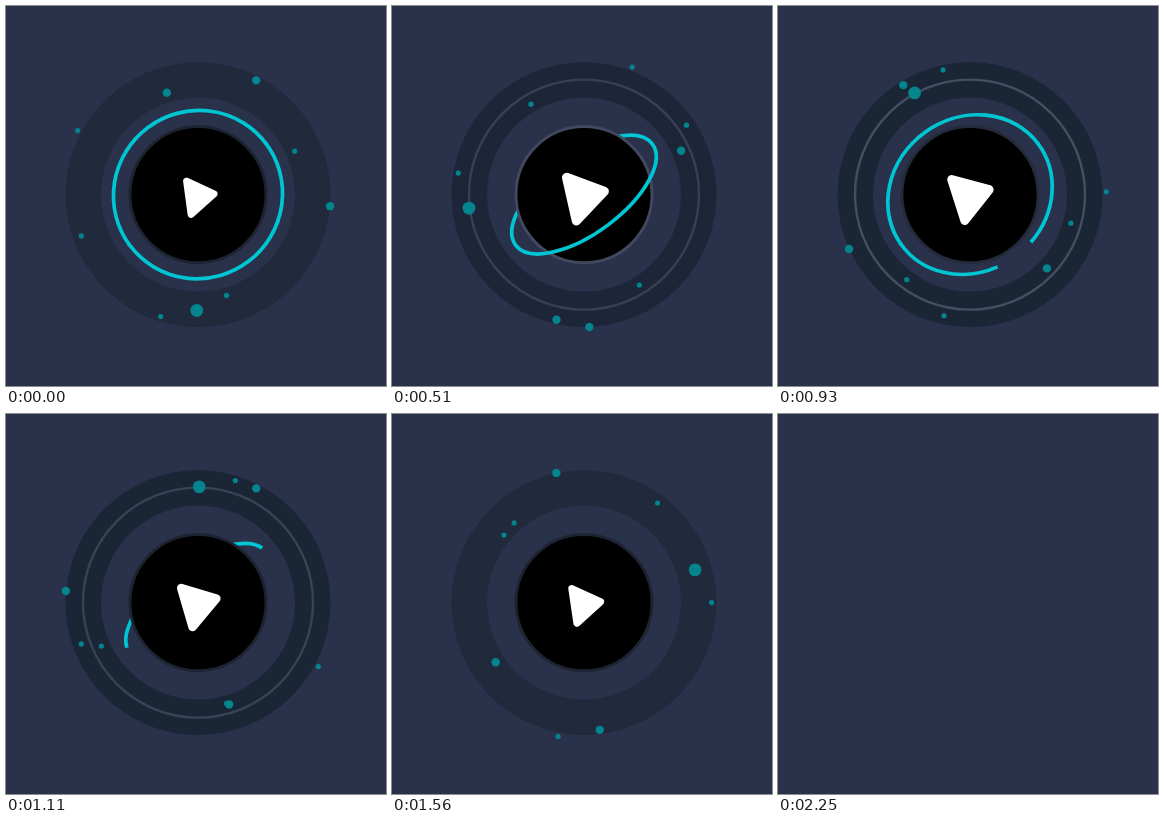
Recreate the animation shown at these times as an HTML page with a canvas. Size 380 by 380 pixels, loop 2.28 s.

```html
<!DOCTYPE html>
<html lang="en">
<head>
<meta charset="utf-8">
<title>Play button in orbit</title>
<style>
  html, body { margin: 0; width: 100%; height: 100%; overflow: hidden; background: #2a314a; }
  canvas { display: block; width: 380px; height: 380px; }
</style>
</head>
<body>
<canvas id="stage" width="380" height="380"></canvas>
<script>
const ctx = document.getElementById('stage').getContext('2d');
const LOOP = 2280, STEP = 30, LAP = 2220, END = 2250;
const CX = 192, CY = 188.6, TAU = Math.PI * 2;
const BG = '#2a314a', CYAN = '#00c5d3', TEAL = '#04848d';
const TILT = -36.4;

// orbit radius, start angle, dot radius, laps per loop
const dots = [
  [115.8, 90.6, 6.4, 1],
  [106.6, -107, 4.2, 1],
  [128.2, -63, 4.2, 2],
  [132.6, 5, 4.2, 1],
  [136.3, 208, 2.6, 1],
  [106, -24.2, 2.6, 1],
  [123.8, 160.5, 2.6, 2],
  [127.6, 107, 2.6, 1],
  [104.8, 74.2, 2.6, 2]
];

const rad = d => d * Math.PI / 180;
const mix = (a, b, k) => a + (b - a) * k;
const clamp = x => Math.min(1, Math.max(0, x));
const ramp = (t, a, b) => clamp((t - a) / (b - a));
const ease = (t, a, b) => { const p = ramp(t, a, b); return p * p * (3 - 2 * p); };
const pulse = (t, a, b, c, d) => ease(t, a, b) - ease(t, c, d);
const blend = (a, b, k) => `rgb(${a.map((v, i) => Math.round(mix(v, b[i], k)))})`;

function disc(x, y, r, fill) {
  ctx.beginPath();
  ctx.arc(x, y, r, 0, TAU);
  ctx.fillStyle = fill;
  ctx.fill();
}

function circle(r, width, color) {
  ctx.beginPath();
  ctx.arc(CX, CY, r, 0, TAU);
  ctx.lineWidth = width;
  ctx.strokeStyle = color;
  ctx.stroke();
}

function band(t) {
  const dark = pulse(t, 330, 630, 1080, 1500);
  disc(CX, CY, 132.5, blend([33, 41, 61], [26, 37, 54], dark));
  disc(CX, CY, 97, BG);
  const line = pulse(t, 330, 630, 900, 1500);
  if (line > 0) circle(115, 2.4, `rgba(76,83,102,${0.9 * line})`);
}

// The ring spins about its long axis; gap is the half angle missing at the front.
function ring(t, front) {
  const late = t > 1900;
  const spin = 10 + 0.21 * (late ? t - LAP : t);
  const gap = 180 * (late ? 1 - ease(t, 1980, LAP) : ramp(t, 900, 1283));
  if (gap >= 180) return;
  const b = 85 * Math.abs(Math.cos(rad(spin)));
  const arc = (from, to) => {
    if (to <= from) return;
    ctx.beginPath();
    ctx.ellipse(CX, CY, 85, b, rad(TILT), rad(from), rad(to));
    ctx.stroke();
  };
  ctx.lineWidth = 3.7;
  ctx.strokeStyle = CYAN;
  if (!front) {
    const cut = Math.max(0, gap - 90);
    arc(180 + cut, 360 - cut);
  } else if (gap === 0) {
    arc(-1, 181);
  } else {
    arc(-1, 90 - gap);
    arc(90 + gap, 181);
  }
}

function planet(t) {
  disc(CX, CY, 68, '#000');
  circle(68, 2.8, blend([29, 35, 48], [74, 81, 104], pulse(t, 0, 300, 300, 1140)));
}

function playIcon(t) {
  const k = 1 + 0.345 * pulse(t, 0, 600, 600, 1800);
  ctx.save();
  ctx.translate(mix(191.2, 190.3, (k - 1) / 0.345), 190.4);
  ctx.rotate(rad(-10 * pulse(t, 150, 870, 930, 1680)));
  ctx.scale(k, k);
  ctx.beginPath();
  ctx.moveTo(-10.6, -15.3);
  ctx.lineTo(16.8, -2.4);
  ctx.lineTo(-6.1, 18);
  ctx.closePath();
  ctx.lineJoin = 'round';
  ctx.lineWidth = 7;
  ctx.strokeStyle = ctx.fillStyle = '#fff';
  ctx.fill();
  ctx.stroke();
  ctx.restore();
}

function draw(t) {
  ctx.fillStyle = BG;
  ctx.fillRect(0, 0, 380, 380);
  if (t >= END) return;
  band(t);
  for (const [r, start, size, laps] of dots) {
    const a = rad(start + 360 * laps * t / LAP);
    disc(CX + r * Math.cos(a), CY + r * Math.sin(a), size, TEAL);
  }
  ring(t, false);
  planet(t);
  ring(t, true);
  playIcon(t);
}

const begin = performance.now();
function tick() {
  const t = (performance.now() - begin) % LOOP;
  draw(Math.floor(t / STEP) * STEP);
  requestAnimationFrame(tick);
}
tick();
</script>
</body>
</html>
```
